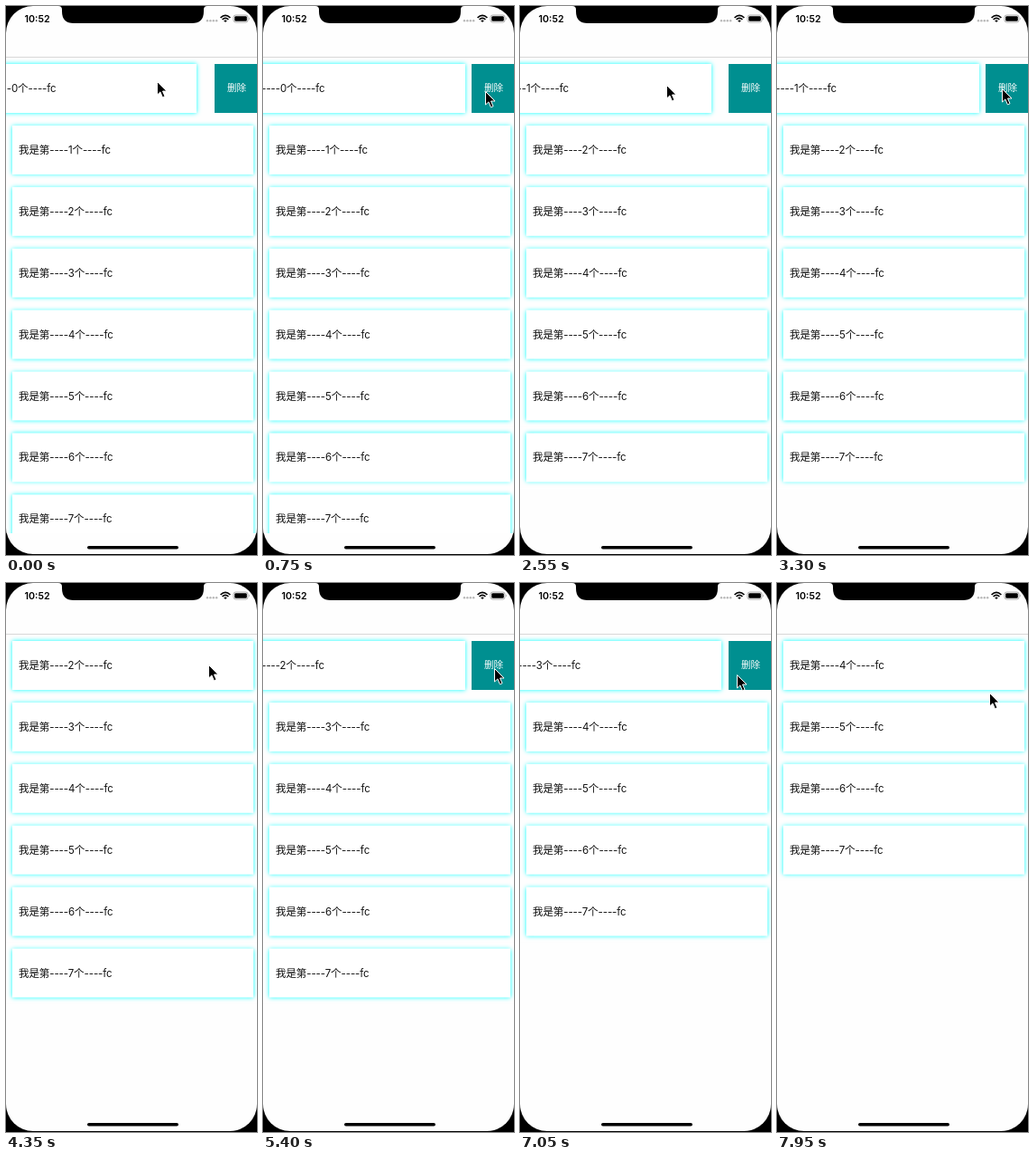
Animation of 278 by 606 pixels, one loop 8000 ms. Source, as an HTML page:

```html
<!DOCTYPE html>
<html lang="zh-CN">
<head>
<meta charset="utf-8">
<title>Swipe to delete</title>
<style>
  html, body { margin: 0; width: 100%; height: 100%; overflow: hidden; background: #000; }
  #screen {
    position: absolute; left: 0; top: 0; width: 278px; height: 605px;
    border-radius: 30px; overflow: hidden; background: #fefefe;
    font-family: Inter, "Noto Sans CJK SC", "Noto Sans CJK", sans-serif;
  }
  #list {
    position: absolute; left: 0; top: 56px; width: 278px; height: 526px;
    box-sizing: border-box; border-top: 1px solid #d8d8d8; overflow: hidden;
  }
  #remove {
    position: absolute; left: 231px; top: 7px; width: 47px; height: 53.5px;
    background: #008f90; color: #fff; text-align: center;
    font-size: 10.5px; font-weight: 500; line-height: 54px; text-indent: 2px;
  }
  .row { position: absolute; left: 0; top: 0; width: 278px; height: 67.9px; background: #fefefe; }
  .card {
    position: absolute; left: 7px; top: 7px; width: 267px; height: 54px;
    box-sizing: border-box; padding-left: 7px; background: #fff;
    box-shadow: 0 0 5px #0ff; color: #111; white-space: nowrap;
    font-size: 11.5px; line-height: 54px; letter-spacing: -.1px;
    font-feature-settings: "calt" 0;
  }
  svg { position: absolute; left: 0; top: 0; }
  svg text { font: 600 10.7px Inter, sans-serif; }
</style>
</head>
<body>
<div id="screen">
  <div id="list"><div id="remove">删除</div></div>
  <svg width="278" height="605">
    <path d="M58 0Q62 0 62 4V6Q62 19 75 19H206Q219 19 219 6V4Q219 0 223 0Z"/>
    <text x="20.5" y="17.5">10:52</text>
    <g fill="#b8b8b8">
      <circle cx="223" cy="16.3" r="1.2"/><circle cx="226.4" cy="16.3" r="1.2"/>
      <circle cx="229.8" cy="16.3" r="1.2"/><circle cx="233.2" cy="16.3" r="1.2"/>
    </g>
    <g fill="none" stroke="#000" stroke-width="1.7">
      <path d="M237.6 13Q243 7.8 248.4 13M239.6 15Q243 11.7 246.4 15"/>
    </g>
    <path d="M241.2 16.2Q243 14.7 244.8 16.2L243 18Z"/>
    <rect x="252" y="10" width="16" height="8" rx="2.4" fill="none" stroke="#999" stroke-width=".8"/>
    <rect x="253.2" y="11.2" width="13.6" height="5.6" rx="1.4"/>
    <path d="M269 12.6Q270.6 14 269 15.4Z" fill="#999"/>
    <rect x="90" y="596" width="101" height="3.6" rx="1.8"/>
    <path id="cursor" d="M.5.5V15L3.9 11.9 6.4 17.8 9 16.7 6.5 11H11Z" stroke="#fff" stroke-width="1"/>
  </svg>
</div>
<script>
  const LOOP = 8000, STEP = 150, PITCH = 67.9, COUNT = 8;
  const DELETES = [1350, 3600, 5700, 7500];

  // time, pointer x, pointer y
  const pointer = [
    [0, 167, 83], [150, 176, 84], [450, 225, 91], [750, 246, 94], [1500, 246, 94],
    [1950, 236, 123], [2100, 234, 138], [2250, 226, 108], [2550, 162, 87],
    [2700, 176, 87], [3000, 232, 92], [3300, 249, 91], [3750, 249, 91],
    [4050, 238, 110], [4350, 224, 90], [4500, 206, 88], [4800, 158, 86],
    [5100, 214, 92], [5400, 256, 94], [5700, 256, 94], [6000, 240, 105],
    [6150, 228, 100], [6600, 160, 87], [6750, 165, 88], [7050, 240, 101],
    [7350, 247, 99], [7650, 247, 99], [7950, 235, 121]
  ];
  // time, offset of the top row
  const swipe = [
    [0, -63], [150, -61], [450, -52], [600, -50], [1349, -50], [1350, 0],
    [2250, 0], [2550, -62], [2700, -60], [3000, -51], [3150, -50], [3599, -50], [3600, 0],
    [4350, 0], [4800, -63], [5100, -52], [5250, -50], [5699, -50], [5700, 0],
    [6150, 0], [6600, -62], [6750, -62], [7050, -51], [7200, -50], [7499, -50], [7500, 0]
  ];

  const $ = id => document.getElementById(id);
  const rows = Array.from({ length: COUNT }, (_, i) => {
    const row = document.createElement("div");
    row.className = "row";
    row.innerHTML = `<div class="card">我是第----${i}个----fc</div>`;
    return $("list").appendChild(row);
  });

  function sample(keys, t, col = 1) {
    const i = keys.findIndex(k => k[0] > t);
    if (i < 0) return keys[keys.length - 1][col];
    const a = keys[i - 1], b = keys[i];
    return a[col] + (b[col] - a[col]) * (t - a[0]) / (b[0] - a[0]);
  }

  function draw(time) {
    const t = Math.floor((time % LOOP) / STEP) * STEP;
    const gone = DELETES.filter(d => d <= t).length;
    const offset = sample(swipe, t);
    rows.forEach((row, i) => {
      const x = i === gone ? offset : 0;
      row.style.display = i < gone ? "none" : "";
      row.style.transform = `translate(${x}px, ${(i - gone) * PITCH}px)`;
    });
    $("cursor").setAttribute("transform", `translate(${sample(pointer, t)} ${sample(pointer, t, 2)})`);
  }

  const start = performance.now();
  function tick() {
    draw(performance.now() - start);
    requestAnimationFrame(tick);
  }
  tick();
</script>
</body>
</html>
```
